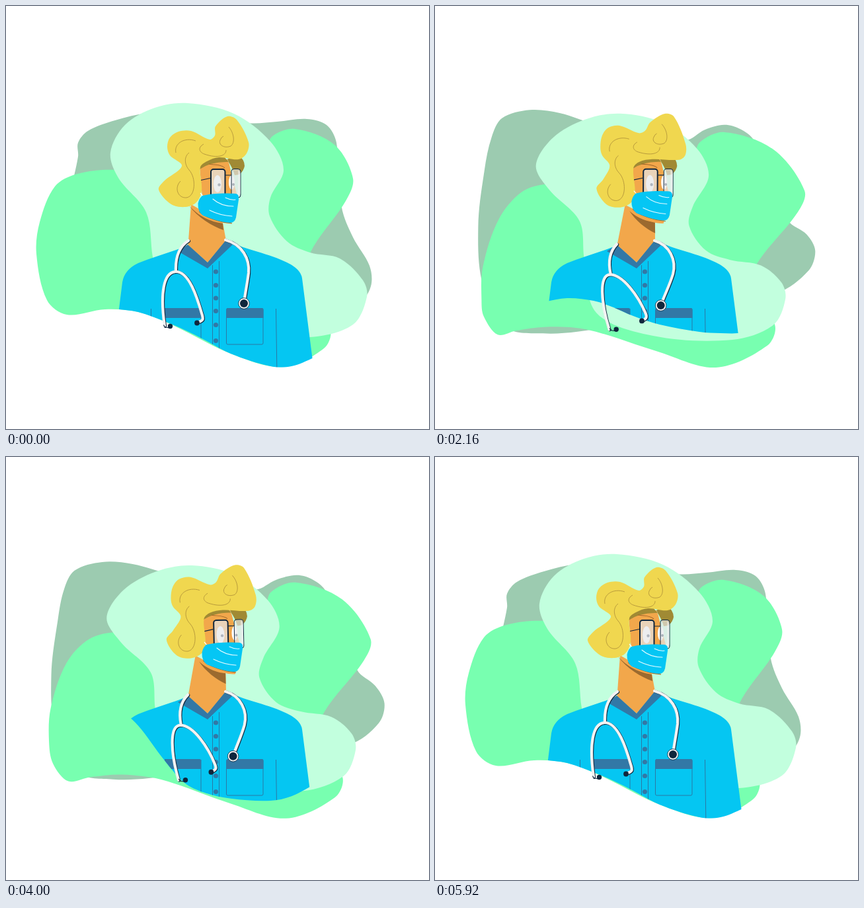
Write an HTML page that moves like this. It is 640x640 px and loops after 5960 ms.

```html
<!DOCTYPE html>
<html lang="en">
<head>
<meta charset="utf-8">
<title>Doctor</title>
<style>
  html, body { margin: 0; width: 100%; height: 100%; overflow: hidden; background: #fff; }
  svg { display: block; width: 100vw; height: 100vh; }
  .line { fill: none; stroke: #2b78a4; stroke-width: 1; }
  .curl { fill: none; stroke: #b3953a; stroke-width: .9; }
  .fold { fill: none; stroke: #e9fbff; stroke-width: 1.1; stroke-linecap: round; }
  .tube { fill: none; stroke: #f3f3f3; stroke-width: 4.2; stroke-linecap: round; }
  .shade { fill: none; stroke: #10263c; stroke-width: 4.4; stroke-linecap: round; }
</style>
</head>
<body>
<svg viewBox="0 0 640 640">
  <defs><clipPath id="matte"><path id="mattePath"/></clipPath></defs>
  <path id="back" fill="#9ccbb0"/>
  <path id="middle" fill="#78ffb0"/>
  <path id="front" fill="#c2ffde"/>

  <path id="neck" fill="#f2a74b"/>
  <path id="neckShade" fill="#9b6a2f"/>

  <g clip-path="url(#matte)">
    <path fill="#05c6f2" d="M160 560L171 458L176 418Q179 399 200 389C222 380 245 374 268 365L305 392L340 357C360 368 400 375 425 388Q446 398 448 412L467 560Z"/>
    <path fill="#3278a6" d="M275 361L305 388L333 354L343 361L305 397L260 371Z"/>
    <path class="line" d="M312.5 392V560M322.5 386V560M408.5 458L410 560M219.5 458V560M295 458V560"/>
    <rect class="line" x="333.5" y="457.5" width="55.5" height="54.5" rx="2"/>
    <path fill="#3278a6" d="M333.5 472V459Q333.5 457 336 457H387Q389.5 457 389.5 459V472ZM240 472V457H293Q295 457 295 459V472Z"/>
    <g id="buttons" fill="#3278a6"></g>
  </g>

  <g id="tubes"></g>
  <g fill="#10263c">
    <circle id="tipLeft" r="3.7"/>
    <circle id="tipRight" r="3.9"/>
    <circle id="chestRing" r="8.3" fill="#f3f3f3" stroke="#10263c" stroke-width=".8"/>
    <circle id="chest" r="6"/>
  </g>

  <g id="face">
    <path fill="#f2a74b" d="M293 243L297 290L299 316Q324 330 341 329L347 300L349 284L343 262L338 240L335 232L300 235Z"/>
    <path fill="#a08a34" d="M293 247Q310 235 337 236L335 232L350 224Q361 232 361 242Q360 249 353 255L346 256Q342 243 336 235L330 228H300L292 240Z"/>
    <path fill="none" stroke="#a0662a" d="M307 239C316 241 324 239 331 245"/>
    <g id="eyes">
      <ellipse cx="320" cy="269" rx="6" ry="13" fill="#fff"/>
      <ellipse cx="341.5" cy="267" rx="4.5" ry="11" fill="#fff"/>
      <circle cx="322.5" cy="270.5" r="2.2" fill="#33455c"/>
      <circle cx="344" cy="270" r="2" fill="#33455c"/>
    </g>
    <rect x="341" y="246.5" width="14" height="43.5" rx="4" fill="#e6e6e8" fill-opacity=".68" stroke="#10263c"/>
    <path d="M351 249Q354.5 249 354.5 254V284Q352 288 350 288Q352 268 351 249Z" fill="#f2f2f2" opacity=".6"/>
    <rect x="310" y="247" width="21.5" height="46" rx="4" fill="#e6e6e8" fill-opacity=".7" stroke="#10263c" stroke-width="2"/>
    <path d="M295 263.5L309 260.5M332 256H341" fill="none" stroke="#10263c" stroke-width="1.2"/>
  </g>

  <g id="head">
    <path id="hair" fill="#f0d74f"/>
    <g id="topCurls" class="curl">
      <path d="M257 222C254 208 270 198 287 204"/>
      <path d="M299 209C290 214 292 221 300 224C320 231 333 227 333 218"/>
      <path d="M337 183C345 192 347 207 340 212C330 216 321 210 324 203Q326 198 329 197"/>
    </g>
    <path id="sideCurl" class="curl" d="M277 222C269 228 270 240 277 248C288 260 287 288 273 290C260 291 254 275 264 265"/>
  </g>

  <g id="mask">
    <path d="M294 283L300 290" stroke="#fff" stroke-width="1.2"/>
    <path fill="none" stroke="#9b6a2f" d="M292 311Q300 320 328 327L342 329"/>
    <path fill="#05c6f4" d="M297 287C312 283 334 283 348 284Q353 285 352 293L348 320Q346 328 339 328C324 327 308 321 298 317Q290 311 290.5 299Q292 291 297 287Z"/>
    <path class="fold" d="M313 292C322 300 332 303 344 303M332 290Q340 294 347 293M308 309Q324 317 342 318"/>
  </g>
</svg>
<script>
const LOOP = 5960;
const $ = id => document.getElementById(id);
const set = (id, attrs) => { for (const k in attrs) $(id).setAttribute(k, attrs[k]); };
const mix = (a, b, p) => a.map((v, i) => v + (b[i] - v) * p);
const clamp = v => Math.max(0, Math.min(1, v));
const smooth = x => x * x * (3 - 2 * x);

// Eased swing out to the peak time and back to the loop end.
const swing = (t, peak) => smooth(t < peak ? t / peak : (LOOP - t) / (LOOP - peak));

// Hermite interpolation through rows of [time, ...values], at rest at both ends.
function track(keys, t) {
  let i = 0;
  while (i < keys.length - 2 && t > keys[i + 1][0]) i++;
  const a = keys[i], b = keys[i + 1], span = b[0] - a[0], u = (t - a[0]) / span;
  const slope = (k, c) => k === 0 || k === keys.length - 1 ? 0
    : (keys[k + 1][c] - keys[k - 1][c]) / (keys[k + 1][0] - keys[k - 1][0]) * span;
  const u2 = u * u, u3 = u2 * u;
  return a.slice(1).map((v, n) => {
    const c = n + 1;
    return v * (2 * u3 - 3 * u2 + 1) + b[c] * (3 * u2 - 2 * u3)
      + slope(i, c) * (u3 - 2 * u2 + u) + slope(i + 1, c) * (u3 - u2);
  });
}

// Smooth cubic from q to r; handles scale with the segment so uneven spacing stays round.
const dist = (a, b) => Math.hypot(a[0] - b[0], a[1] - b[1]);
function segment(p, q, r, s) {
  const len = dist(q, r) / 3;
  const c1 = q.map((v, k) => v + (r[k] - p[k]) * len / (dist(p, q) + dist(q, r)));
  const c2 = r.map((v, k) => v - (s[k] - q[k]) * len / (dist(q, r) + dist(r, s)));
  return `C${c1} ${c2} ${r}`;
}

// Closed curve through flat x, y pairs.
function blob(flat) {
  const n = flat.length / 2;
  const at = i => { const k = (i + n) % n * 2; return [flat[k], flat[k + 1]]; };
  let d = "M" + at(0);
  for (let i = 0; i < n; i++) d += segment(at(i - 1), at(i), at(i + 1), at(i + 2));
  return d + "Z";
}

const back = [
  [109,228, 109,207, 124,189, 165,173, 215,162, 290,160, 365,177, 410,175, 455,171, 485,180, 500,207,
   508,305, 525,350, 550,393, 552,424, 535,445, 300,430, 220,430, 150,423, 110,400, 92,345, 95,295],
  [70,250, 82,198, 98,167, 140,155, 185,162, 240,183, 380,207, 408,189, 435,181, 458,187, 480,203,
   538,327, 568,345, 579,367, 567,397, 515,432, 300,485, 215,502, 165,506, 110,500, 70,435, 61,340]
];
const middle = [
  [46,375, 51,327, 74,273, 108,254, 168,248, 250,260, 340,260, 392,225, 402,198, 437,186, 497,210, 525,261,
   514,295, 460,374, 455,420, 491,490, 481,518, 420,546, 345,528, 250,482, 200,463, 150,459, 92,467, 62,445],
  [71,447, 73,396, 97,324, 132,282, 170,270, 250,270, 340,270, 390,235, 400,207, 438,191, 512,217, 560,280,
   550,312, 488,390, 480,425, 515,483, 503,514, 425,547, 335,522, 230,490, 168,486, 122,492, 95,498, 74,470]
];
const front = [
  [275,147, 345,163, 400,205, 420,248, 400,290, 399,318, 425,356, 460,373, 505,382, 540,415, 546,440,
   525,482, 460,501, 330,497, 238,460, 222,380, 212,312, 170,260, 158,222, 180,180, 225,154],
  [283,171, 345,184, 395,222, 411,262, 385,310, 377,340, 402,377, 440,390, 487,398, 516,420, 522,445,
   505,483, 445,507, 330,500, 247,466, 228,385, 222,332, 175,288, 150,252, 177,210, 228,181]
];
const hair = [
  [335,167, 349,172, 367,206, 364,223, 352,232, 322,229, 304,235, 294,244, 296,280, 288,297, 272,304, 250,300,
   231,278, 239,265, 266,242, 248,226, 244,213, 248,199, 261,190, 280,189, 308,202, 316,196, 317,182],
  [347,164, 361,169, 377,212, 376,229, 367,235, 325,233, 305,236, 296,245, 297,284, 290,298, 272,304, 253,298,
   240,274, 251,260, 259,240, 249,224, 247,212, 250,194, 259,182, 276,179, 305,191, 315,188, 324,176]
];

// Lower edge of the shirt: heights at fixed x positions over time.
const edgeX = [165, 200, 240, 270, 300, 340, 400, 432, 466];
const edgeY = [
  [0, 458, 463, 477, 490, 505, 526, 545, 545, 532],
  [1120, 459, 454, 454, 461, 471, 485, 499, 503, 502],
  [2160, 448, 442, 446, 456, 469, 482, 493, 495, 494],
  [3440, 368, 407, 460, 490, 504, 512, 515, 508, 493],
  [4560, 395, 415, 458, 491, 507, 519, 525, 520, 502],
  [5280, 438, 447, 467, 485, 504, 523, 539, 537, 522]
];
edgeY.push([LOOP, ...edgeY[0].slice(1)]);

const frontKeys = [[0, 0], [1120, .23], [2160, .66], [3150, 1.02], [3440, 1], [4560, .41], [5280, .125], [LOOP, 0]];
const headKeys = [[0, 0], [1120, .93], [1500, 1], [2160, .69], [3150, 0], [3440, .06], [4560, 1], [5280, .46], [LOOP, 0]];
const tiltKeys = [[0, 0], [3440, 0], [4560, -2.5], [5280, -1.6], [LOOP, 0]];

// Cubic runs of the stethoscope, at rest and at full swing.
const tubes = [
  [[276,355, 262,364, 256,380, 257,402], [275,361, 266,371, 262,386, 267,406]],
  [[257,402, 238,402, 233,436, 240,484], [266,407, 249,407, 254,452, 267,490]],
  [[257,402, 277,402, 289,440, 297,468, 299,475, 297,476, 292,478], [266,407, 286,407, 311,440, 322,465, 325,472, 321,473, 318,475]],
  [[332,354, 358,361, 369,383, 367,404, 365,420, 362,434, 361,443], [332,355, 355,362, 365,385, 359,406, 354,421, 347,434, 342,446]]
];
const cubic = p => `M${p.slice(0, 2)}C${p.slice(2)}`;

const neckShade = [
  [277,302, 295,322, 315,327, 328,329, 329,339, 312,333, 290,320],
  [302,314, 313,322, 325,326, 335,326, 335,346, 322,339, 310,327]
];

function add(parent, tag, attrs) {
  const el = document.createElementNS("http://www.w3.org/2000/svg", tag);
  for (const k in attrs) el.setAttribute(k, attrs[k]);
  return $(parent).appendChild(el);
}
for (const cy of [402, 422.5, 442, 461.5, 482.5, 506.5]) add("buttons", "circle", { cx: 317.5, cy, r: 3.6 });
const shades = tubes.map(() => add("tubes", "path", { class: "shade", transform: "translate(1 .7)" }));
const pipes = tubes.map(() => add("tubes", "path", { class: "tube" }));
const wire = add("tubes", "path", { fill: "none", stroke: "#10263c", "stroke-width": 1.2 });

function place(id, from, to, p) {
  const [cx, cy] = mix(from, to, p);
  set(id, { cx, cy });
  return [cx, cy];
}

function edgePath(t) {
  const ys = track(edgeY, t), last = edgeX.length - 1;
  const at = i => i < 0 ? [edgeX[0] - 20, 2 * ys[0] - ys[1]]
    : i > last ? [edgeX[last] + 20, ys[last] - 10] : [edgeX[i], ys[i]];
  let d = `M150 300V${ys[0] - 6}L${at(0)}`;
  for (let i = 0; i < last; i++) d += segment(at(i - 1), at(i), at(i + 1), at(i + 2));
  return d + `L480 ${ys[last] - 8}V300Z`;
}

function draw(t) {
  const sway = swing(t, 2980) * 1.07;
  const [drift] = track(frontKeys, t);
  const [turn] = track(headKeys, t);
  const [tilt] = track(tiltKeys, t);

  set("back", { d: blob(mix(...back, sway)) });
  set("middle", { d: blob(mix(...middle, swing(t, 2800) * 1.125)) });
  set("front", { d: blob(mix(...front, drift)) });
  set("mattePath", { d: edgePath(t) });

  const [lx, ly, rx, ry] = mix([280, 300, 328, 328], [291, 301, 335, 322], turn);
  set("neck", { d: `M${lx} ${ly}L275.5 362L305 388L333 355L${rx} ${ry}Z` });
  const s = mix(...neckShade, turn);
  set("neckShade", { d: `${cubic(s.slice(0, 8))}L${s.slice(8, 10)}C${s.slice(10)} ${s.slice(0, 2)}Z` });

  tubes.forEach((pair, i) => {
    const d = cubic(mix(...pair, sway));
    shades[i].setAttribute("d", d);
    pipes[i].setAttribute("d", d);
  });
  const [tx, ty] = place("tipLeft", [248.5, 484.5], [278, 490], sway);
  wire.setAttribute("d", `M${tx - 10} ${ty - 2}Q${tx - 9} ${ty + 3} ${tx} ${ty + 2}`);
  place("tipRight", [289, 479.5], [316.5, 476], sway);
  for (const id of ["chestRing", "chest"]) place(id, [360, 450], [339, 453.5], sway);

  set("face", { transform: `translate(${7.5 * turn} ${-.3 * turn}) rotate(${tilt} 325 268)` });
  const open = clamp((Math.abs(t - 1120) - 50) / 110);
  set("eyes", { transform: `translate(0 ${269 * (1 - open)}) scale(1 ${open})` });
  set("head", { transform: `translate(${7.5 * turn}) rotate(${-2.5 * turn} 300 265)` });
  set("hair", { d: blob(mix(...hair, sway)) });
  set("topCurls", { transform: `translate(${4 * sway} ${-3.5 * sway})` });
  set("sideCurl", { transform: `translate(${-4 * sway} ${4 * sway})` });
  set("mask", { transform: `translate(${10 * turn} ${-5 * turn})` });
}

const start = performance.now();
function tick(now) {
  draw(Math.max(0, now - start) % LOOP);
  requestAnimationFrame(tick);
}
draw(0);
requestAnimationFrame(tick);
</script>
</body>
</html>
```
